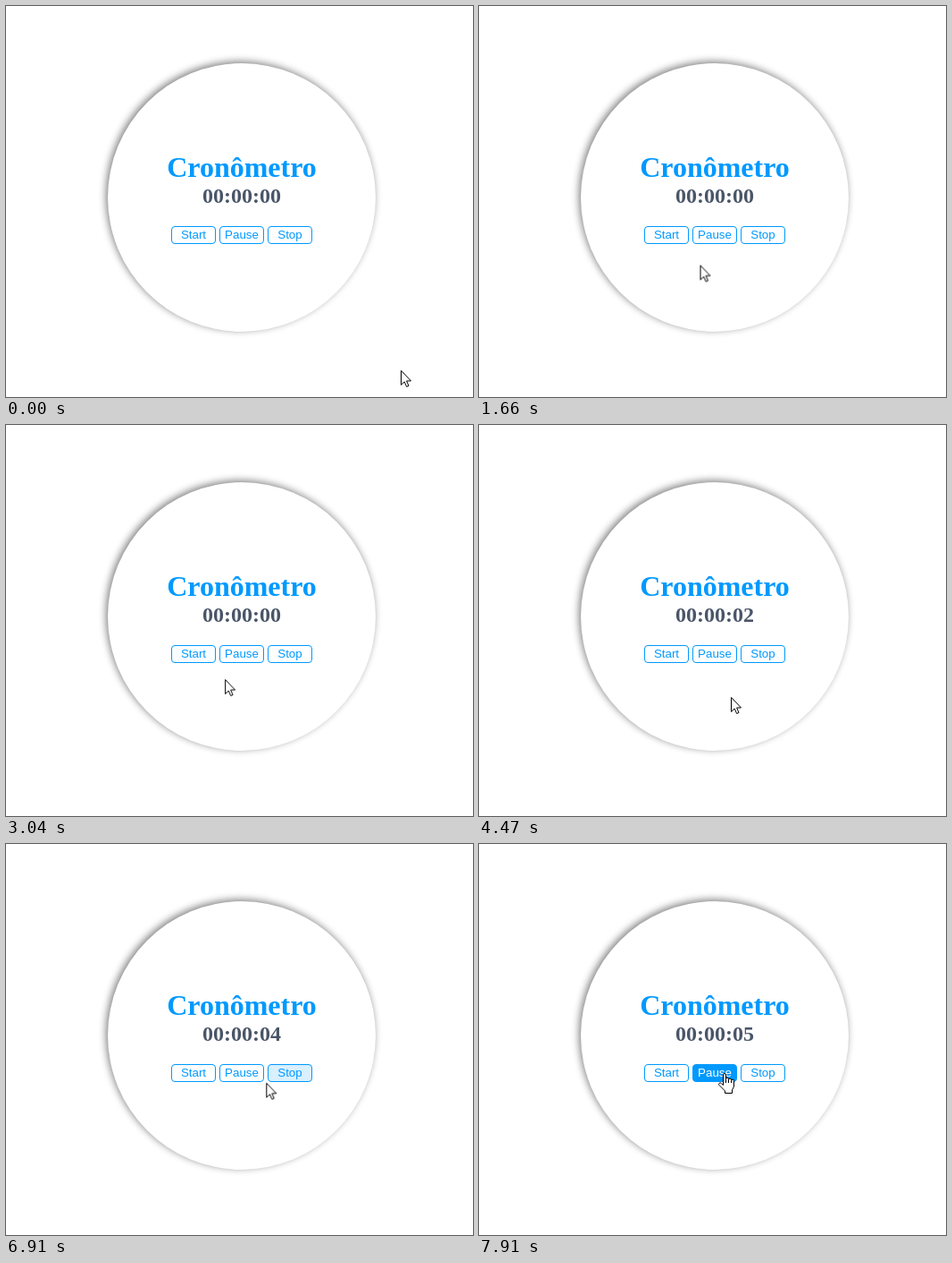
An HTML page for the animation above (8000 ms loop, 523 by 437 pixels).

```html
<!DOCTYPE html>
<html lang="pt-BR">
<head>
<meta charset="utf-8">
<title>Cronômetro</title>
<style>
@property --seconds { syntax: "<integer>"; inherits: true; initial-value: 0; }
@property --hand { syntax: "<integer>"; inherits: true; initial-value: 0; }

html, body { margin: 0; width: 100%; height: 100%; overflow: hidden; background: #fff; }
.stage { position: relative; width: 523px; height: 437px; overflow: hidden; }
.stage > * { position: absolute; box-sizing: border-box; margin: 0; }

.dial {
  left: 114px; top: 64px; width: 300px; height: 300px;
  border-radius: 50%; box-shadow: -2px -2px 8px #808080;
}
h1, .time {
  left: 0; width: 528px; text-align: center; white-space: nowrap;
  font-family: "Liberation Serif", "Times New Roman", serif; font-weight: bold;
}
h1 { top: 162px; font-size: 32px; line-height: 36px; color: #09f; }
.time {
  top: 199px; font-size: 24px; line-height: 26px; color: #4a5568;
  animation: tick 8s step-end infinite;
}
.time::after { counter-reset: s var(--seconds); content: counter(s); }

.button {
  top: 246px; width: 50px; height: 20px;
  border: 1px solid #09f; border-radius: 4px;
  font: 13.333px/18px "Liberation Sans", Arial, sans-serif;
  text-align: center; color: #09f; background: #fff;
  animation: 8s ease infinite;
}
.start { left: 185px; animation-name: start; }
.pause { left: 239px; animation-name: pause; }
.stop { left: 293px; animation-name: stop; }

.cursor {
  left: 0; top: 0; width: 20px; height: 26px; overflow: visible;
  fill: #fff; stroke: #000; stroke-linejoin: round;
  animation: move 8s linear infinite, shape 8s step-end infinite;
}
.arrow { opacity: calc(1 - var(--hand)); }
.hand { opacity: var(--hand); }

@keyframes tick {
  0% { --seconds: 0; }
  43.75% { --seconds: 1; }
  55.875% { --seconds: 2; }
  68% { --seconds: 3; }
  80.5% { --seconds: 4; }
  91.75%, 100% { --seconds: 5; }
}
@keyframes start {
  0%, 23.125%, 38.75%, 100% { background: #fff; color: #09f; }
  26.875%, 35% { background: #09f; color: #fff; }
}
@keyframes pause {
  0%, 87.75% { background: #fff; color: #09f; }
  91.5%, 100% { background: #09f; color: #fff; }
}
@keyframes stop {
  0%, 85%, 88.75%, 100% { background: #fff; }
  85.875% { background: #ccebff; }
}
@keyframes shape {
  0%, 35%, 85.875% { --hand: 0; }
  23.125%, 85%, 87.75%, 100% { --hand: 1; }
}
@keyframes move {
  0%, 3.25% { transform: translate(442px, 407px); }
  4.5% { transform: translate(424px, 398px); }
  6.25% { transform: translate(372px, 371px); }
  8.125% { transform: translate(324px, 345px); }
  10% { transform: translate(301px, 333px); }
  13.25%, 13.5% { transform: translate(279px, 320px); }
  15.125%, 19.5% { transform: translate(260px, 302px); }
  23.125% { transform: translate(224px, 266px); }
  26.5% { transform: translate(216px, 258px); }
  28.625%, 30.24% { transform: translate(215px, 245px); }
  30.25%, 34% { transform: translate(209px, 246px); }
  35% { transform: translate(220px, 266px); }
  38% { transform: translate(245px, 284px); }
  41.75%, 80.5% { transform: translate(282px, 304px); }
  85% { transform: translate(298px, 266px); }
  85.875% { transform: translate(294px, 267px); }
  87.75% { transform: translate(284px, 266px); }
  89.375% { transform: translate(277px, 257px); }
  90.5%, 97.24% { transform: translate(275px, 257px); }
  97.25%, 98.86% { transform: translate(268px, 243px); }
  98.875%, 100% { transform: translate(274px, 256px); }
}
</style>
</head>
<body>
<div class="stage">
  <div class="dial"></div>
  <h1>Cronômetro</h1>
  <div class="time">00:00:0</div>
  <div class="button start">Start</div>
  <div class="button pause">Pause</div>
  <div class="button stop">Stop</div>
  <svg class="cursor">
    <path class="arrow" d="M.5.5V16.5L4.2 13L6.6 18.5L9 17.5L6.6 12H11.5Z"/>
    <g class="hand" transform="translate(-6 0)">
      <path d="M5.5 13.5V2a1.5 1.5 0 0 1 3 0V6.5a1.5 1.3 0 0 1 3 0V7.5a1.5 1.3 0 0 1 3 0V8.5a1.5 1.3 0 0 1 3 0V15L15.5 19V22.5H7.5V20L1 13.5a1.5 1.5 0 0 1 2.3-2Z"/>
      <path fill="none" d="M8.5 6.5V11M11.5 7.5V11M14.5 8.5V11"/>
    </g>
  </svg>
</div>
</body>
</html>
```
